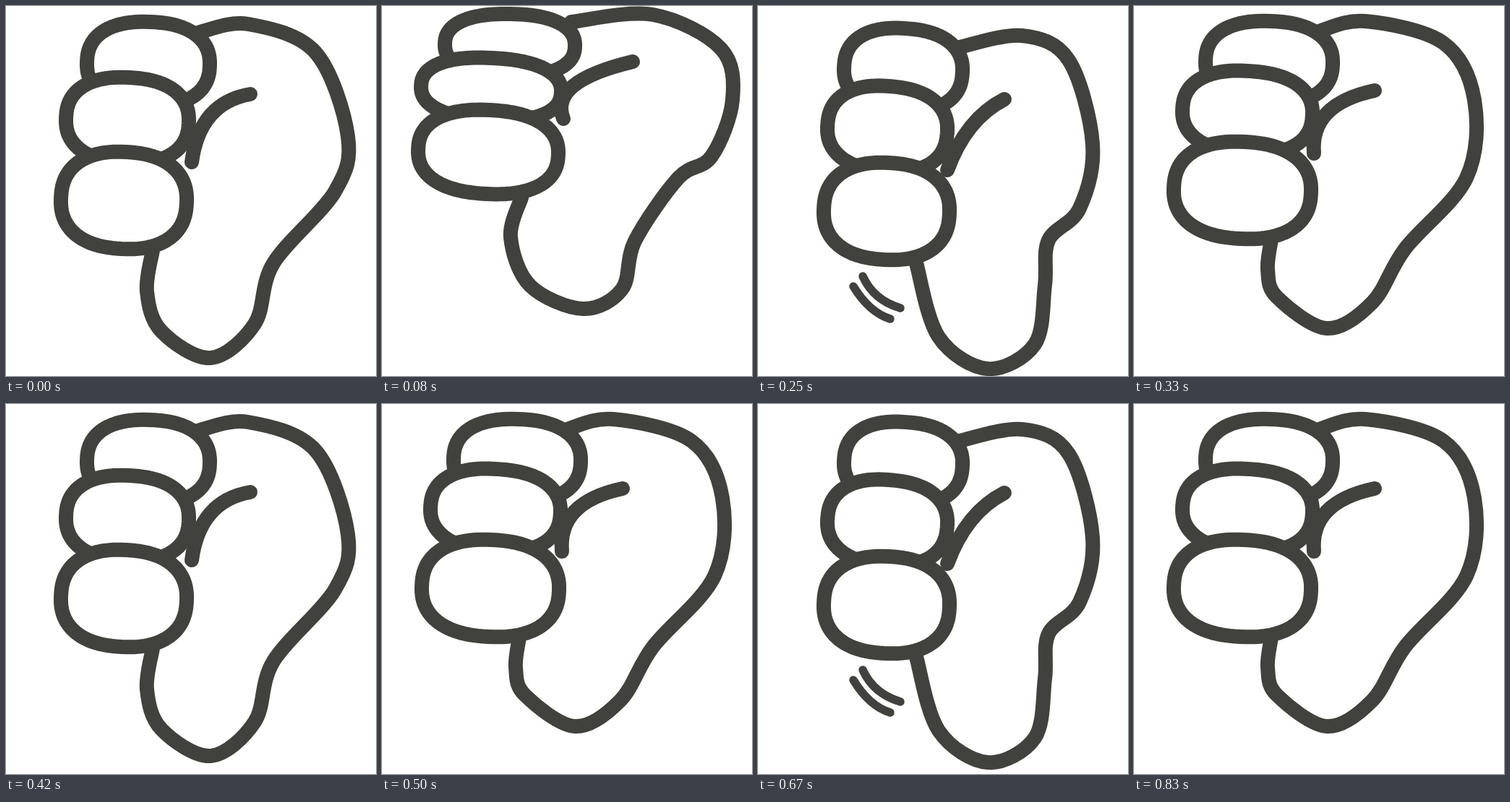
An HTML page that plays this animation: 512 px wide and 512 px high, repeating every 910 ms.

```html
<!DOCTYPE html>
<html lang="en">
<head>
<meta charset="utf-8">
<title>Thumbs down</title>
<style>
  html, body { margin: 0; width: 100%; height: 100%; overflow: hidden; background: #fff; }
  svg { display: block; width: 100%; height: 100%; overflow: hidden; }
  path { fill: #fff; stroke: #41413d; stroke-width: 20; stroke-linecap: round; stroke-linejoin: round; }
  .crease { fill: none; }
  .swish { fill: none; stroke-width: 11.5; }

  /* Poses sit side by side; the strip jumps from one to the next. */
  #strip { animation: shake 910ms step-end infinite; }
  @keyframes shake {
    0%, 46.153%, 82.417%, 100% { transform: translateX(0); }
    8.791% { transform: translateX(-512px); }
    18.681%, 36.263%, 54.945%, 91.208% { transform: translateX(-1024px); }
    73.626% { transform: translateX(-1536px); }
    27.472% { transform: translateX(-2048px); }
    63.736% { transform: translateX(-2560px); }
  }
</style>
</head>
<body>
<svg viewBox="0 0 512 512"><g id="strip"></g></svg>
<script>
  // palm: points of a smooth line; fingers: centre, radii and tilt, top to bottom
  const soft = {
    palm: '268 36,335 25,428 64,473 180,455 257,370 356,344 440,283 487,215 450,195 395,203 338',
    fingers: ['197 80 85 58 2', '168 158 85 59 3', '163 269 87 67 3'],
    crease: 'M338 122Q268 134 257 216'
  };
  const high = {
    palm: '262 22,375 12,469 59,485 130,456 208,410 238,350 325,332 392,278 419,205 387,178 320,193 265',
    fingers: ['177 54 90 43 1', '151 115 97 43 3', '147 202 97 58 3'],
    crease: 'M347 77Q230 105 251 156'
  };
  const rest = {
    palm: '256 35,320 21,428 51,471 130,460 238,375 336,330 410,267 446,198 403,185 365,190 323',
    fingers: ['187 78 88 57 2', '157 147 90 57 4', '150 255 95 67 3'],
    crease: 'M333 117Q243 136 249 204'
  };
  const low = {
    palm: '275 52,365 35,430 69,463 185,445 274,402 318,397 380,383 462,318 496,250 452,219 350',
    fingers: ['201 82 82 57 4', '179 164 83 59 5', '178 278 87 67 3'],
    crease: 'M341 123Q288 150 262 221',
    swish: 'M145 368Q160 401 197 412M132 382Q154 418 183 427'
  };

  const nums = s => s.split(' ').map(Number);

  // Catmull-Rom spline as cubic curves
  function spline(text) {
    const p = text.split(',').map(nums);
    const at = i => p[Math.max(0, Math.min(p.length - 1, i))];
    const handle = (i, dir) => at(i).map((v, k) => v + dir * (at(i + 1)[k] - at(i - 1)[k]) / 6);
    return 'M' + p[0] + p.slice(1).map((q, i) => `C${handle(i, 1)} ${handle(i + 1, -1)} ${q}`).join('');
  }

  // Tilted superellipse
  function finger(text) {
    const [cx, cy, rx, ry, tilt] = nums(text);
    const a = tilt * Math.PI / 180, steps = 120, power = 2 / 2.35;
    const bulge = v => Math.sign(v) * Math.abs(v) ** power;
    const points = Array.from({ length: steps }, (_, i) => {
      const t = i / steps * 2 * Math.PI;
      const x = rx * bulge(Math.cos(t)), y = ry * bulge(Math.sin(t));
      return [cx + x * Math.cos(a) - y * Math.sin(a), cy + x * Math.sin(a) + y * Math.cos(a)]
        .map(v => v.toFixed(2));
    });
    return 'M' + points.join('L') + 'Z';
  }

  const path = (d, name = '') => `<path class="${name}" d="${d}"/>`;

  const hand = pose => path(spline(pose.palm)) +
    pose.fingers.map(f => path(finger(f))).join('') +
    path(pose.crease, 'crease') +
    (pose.swish ? path(pose.swish, 'swish') : '');

  const cells = [
    [soft], [high], [rest], [low],
    [low, 'translate(0 6)'],
    [high, 'matrix(.993 0 0 1 -9.7 1)']
  ];
  document.getElementById('strip').innerHTML = cells.map(([pose, shift = ''], i) =>
    `<g transform="translate(${i * 512}) ${shift}">${hand(pose)}</g>`).join('');
</script>
</body>
</html>
```
